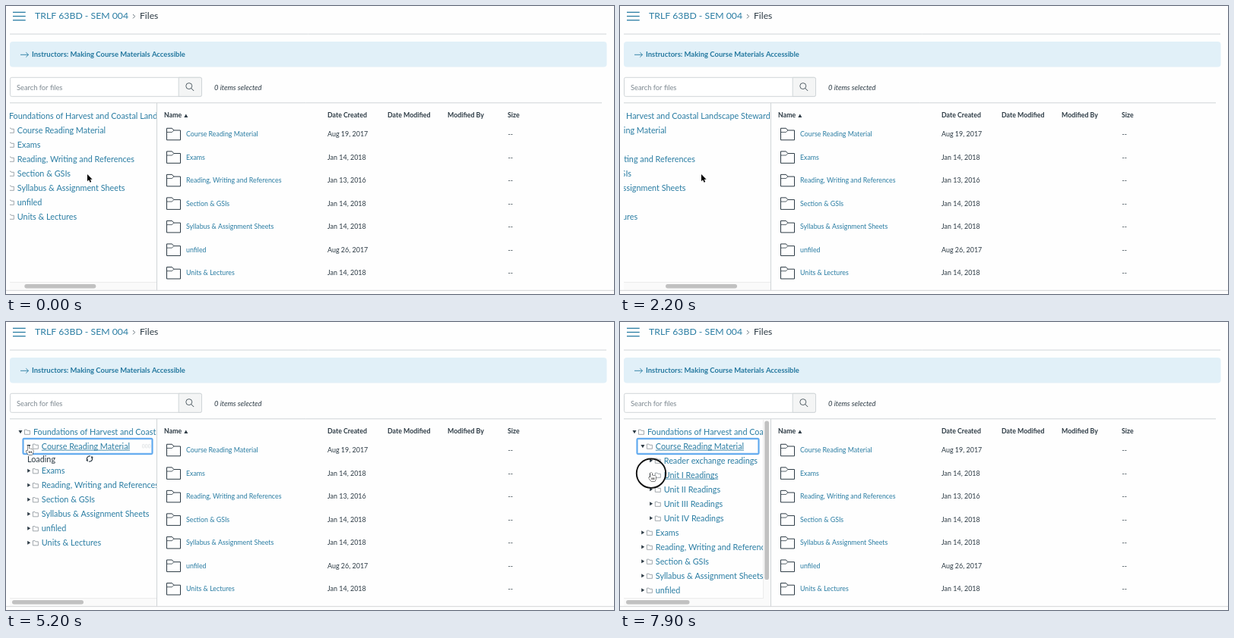
These frames come from a looping animation (800x380 px, 8000 ms). An HTML page with a canvas:

```html
<!DOCTYPE html>
<html lang="en">
<head>
<meta charset="utf-8">
<title>Files</title>
<style>
html, body { margin: 0; width: 100%; height: 100%; overflow: hidden; background: #fefefe; }
canvas { display: block; width: 800px; height: 380px; }
</style>
</head>
<body>
<canvas id="stage"></canvas>
<script>
const canvas = document.getElementById('stage');
const ctx = canvas.getContext('2d');
const dpr = window.devicePixelRatio || 1;
canvas.width = 800 * dpr;
canvas.height = 380 * dpr;

const LOOP = 8000, STEP = 100;
const LINK = '#2a7da3', DARK = '#2d3b45', RULE = '#d0d5d8';
const TREE = 10.83, CELL = 8.82;

const COURSE = 'TRLF 63BD - SEM 004';
const ROOT = 'Foundations of Harvest and Coastal Landscape Stewardship';
const FOLDERS = [
  ['Course Reading Material', 'Aug 19, 2017'],
  ['Exams', 'Jan 14, 2018'],
  ['Reading, Writing and References', 'Jan 13, 2016'],
  ['Section & GSIs', 'Jan 14, 2018'],
  ['Syllabus & Assignment Sheets', 'Jan 14, 2018'],
  ['unfiled', 'Aug 26, 2017'],
  ['Units & Lectures', 'Jan 14, 2018']
];
const READINGS = ['Reader exchange readings', 'Unit I Readings', 'Unit II Readings',
  'Unit III Readings', 'Unit IV Readings'];

// Moments of the interaction, in ms
const HOVER = 4000, OPEN = 4900, LOADED = 5700;

// Keys are [time, value, smooth?]
const SCROLL = [[0, 32], [500, 68], [1000, 102], [2200, 102], [2700, 0, 1]];
const CURSOR_X = [[2800, 107], [3700, 32.5, 1], [3900, 32.5], [4300, 29.5, 1],
  [5900, 29.5], [6600, 36.5, 1], [7000, 36.5], [7500, 41, 1]];
const CURSOR_Y = [[2800, 222], [3700, 163, 1], [5900, 163], [6600, 185, 1],
  [7000, 185], [7500, 198, 1]];

function at(keys, t) {
  if (t <= keys[0][0]) return keys[0][1];
  for (let i = 1; i < keys.length; i++) {
    const [t1, v1, smooth] = keys[i];
    if (t <= t1) {
      const [t0, v0] = keys[i - 1];
      let k = (t - t0) / (t1 - t0);
      if (smooth) k = k * k * (3 - 2 * k);
      return v0 + (v1 - v0) * k;
    }
  }
  return keys[keys.length - 1][1];
}

function text(str, x, y, size, color, style = '') {
  ctx.font = `${style} ${size}px Lato, sans-serif`;
  ctx.fillStyle = color;
  ctx.fillText(str, x, y);
}

function line(points, color, width = 1) {
  ctx.beginPath();
  points.forEach(([x, y], i) => i ? ctx.lineTo(x, y) : ctx.moveTo(x, y));
  ctx.strokeStyle = color;
  ctx.lineWidth = width;
  ctx.stroke();
}

function poly(points, color) {
  ctx.beginPath();
  points.forEach(([x, y]) => ctx.lineTo(x, y));
  ctx.closePath();
  ctx.fillStyle = color;
  ctx.fill();
}

function box(x, y, w, h, r, fill, stroke, width = 1) {
  ctx.beginPath();
  ctx.roundRect(x, y, w, h, r);
  if (fill) { ctx.fillStyle = fill; ctx.fill(); }
  if (stroke) { ctx.strokeStyle = stroke; ctx.lineWidth = width; ctx.stroke(); }
}

function header() {
  for (const y of [8.3, 13.5, 18.7]) line([[9, y], [25.7, y]], LINK, 1.3);
  text(COURSE, 38, 17.3, 12.25, LINK);
  line([[167, 11], [169.6, 13.7], [167, 16.4]], '#6b7780', 1);
  text('Files', 176, 17.3, 12.2, DARK);
  line([[5, 37], [790, 37]], RULE);

  box(5, 47, 785.5, 33.5, 4, '#e1f0f8');
  line([[19, 64.3], [29.5, 64.3]], LINK, 0.9);
  line([[26.3, 61.2], [29.5, 64.3], [26.3, 67.4]], LINK, 0.9);
  text('Instructors: Making Course Materials Accessible', 34, 67.2, 9.48, '#24789f', 'bold');

  box(5.5, 94.3, 252, 25, 2, '#fff', RULE);
  box(227.2, 94.3, 30.3, 25, [0, 2, 2, 0], '#f4f5f5', RULE);
  text('Search for files', 14, 110.5, 9.3, '#7d8890');
  ctx.beginPath();
  ctx.arc(240.8, 105.6, 4, 0, 7);
  ctx.strokeStyle = DARK;
  ctx.lineWidth = 0.8;
  ctx.stroke();
  line([[243.7, 108.5], [247.2, 112]], DARK, 0.9);
  text('0 items selected', 274, 110.7, 9.4, DARK, 'italic');
}

function bigFolder(x, y) {
  line([[x, y + 3], [x, y], [x + 7, y], [x + 9.3, y + 2.7], [x + 18, y + 2.7],
    [x + 18, y + 15.5], [x, y + 15.5], [x, y + 2]], DARK, 1);
  line([[x, y + 5.2], [x + 7, y + 5.2], [x + 9.3, y + 2.7]], DARK, 0.8);
}

function table() {
  line([[5, 127.8], [784, 127.8]], RULE);
  line([[198.5, 128], [198.5, 375]], RULE);
  const heads = [['Name', 208], ['Date Created', 423], ['Date Modified', 502],
    ['Modified By', 581], ['Size', 660]];
  for (const [label, x] of heads) text(label, x, 147.3, 8.8, DARK, 'bold');
  poly([[234.3, 147], [236.8, 142.6], [239.3, 147]], DARK);
  FOLDERS.forEach(([name, date], i) => {
    const y = 169 + i * 30.53;
    bigFolder(211.5, y - 7.7);
    text(name, 237, y + 3.2, CELL, LINK);
    text(date, 423, y + 3.2, 8.95, DARK);
    text('--', 660.5, y + 3.2, CELL, DARK);
  });
}

function treeRow(name, depth, y, open, underline) {
  const x = 16.5 + depth * 10.9;
  if (open) poly([[x, y - 2], [x + 5, y - 2], [x + 2.5, y + 2.3]], DARK);
  else poly([[x + 0.8, y - 2.8], [x + 4.8, y - 0.3], [x + 0.8, y + 2.2]], DARK);
  const fx = x + 8, fy = y - 2.9;
  line([[fx, fy + 1.5], [fx, fy], [fx + 2.7, fy], [fx + 3.5, fy + 1.2], [fx + 7, fy + 1.2],
    [fx + 7, fy + 6.2], [fx, fy + 6.2], [fx, fy + 1]], '#8b949a', 0.8);
  const tx = x + 19.4;
  text(name, tx, y + 3.7, TREE, LINK);
  if (underline) {
    const w = ctx.measureText(name).width;
    line([[tx, y + 5.2], [tx + w, y + 5.2]], LINK, 0.8);
  }
}

function spinner(x, y, angle) {
  ctx.save();
  ctx.translate(x, y);
  ctx.rotate(angle);
  for (let i = 0; i < 2; i++) {
    ctx.beginPath();
    ctx.arc(0, 0, 3.6, 0.25, 2.5);
    ctx.strokeStyle = DARK;
    ctx.lineWidth = 1.2;
    ctx.stroke();
    poly([[4.8, 1.6], [4.4, -1.6], [1.8, 0.9]], DARK);
    ctx.rotate(Math.PI);
  }
  ctx.restore();
}

function tree(t, pointerY) {
  const loaded = t >= LOADED;
  const loading = t >= OPEN && !loaded;
  const scroll = at(SCROLL, t);
  const right = loaded ? 188 : 198;

  ctx.save();
  ctx.beginPath();
  ctx.rect(5, 129, right - 5, 236);
  ctx.clip();
  ctx.translate(-scroll, 0);
  treeRow(ROOT, 0, 145, true, false);
  if (t >= OPEN) {
    const w = loaded ? 160 : 170;
    box(22.5, 153.9, w, 20.2, 2, null, '#c5e0fa', 3);
    box(22.5, 153.9, w, 20.2, 1, null, '#5ba7ee', 1.6);
  }
  treeRow(FOLDERS[0][0], 1, 164, t >= OPEN, t >= HOVER);
  if (t >= HOVER && !loaded) {
    for (let i = 0; i < 3; i++) box(179.5 + i * 4, 161.5, 2.4, 4.5, 0.6, null, '#dde1e4', 0.8);
  }
  let y = 183;
  if (loading) {
    text('Loading', 28, 185.2, TREE, DARK);
    spinner(110, 180.5, (t - OPEN) / 1000 * Math.PI - 1.6);
    y += 13.5;
  }
  if (loaded) {
    for (const name of READINGS) {
      treeRow(name, 2, y, false, Math.abs(pointerY + 1.5 - y) < 9.5);
      y += 19;
    }
  }
  for (const [name] of FOLDERS.slice(1)) {
    treeRow(name, 1, y, false, false);
    y += 19;
  }
  ctx.restore();

  ctx.fillStyle = '#fafafa';
  ctx.fillRect(5, 365, 193, 10);
  line([[5, 364.5], [198, 364.5]], '#ececec');
  box(8 + scroll * 0.51, 367, loaded ? 83.5 : 94, 5.5, 2.75, '#c1c1c1');
  if (loaded) {
    ctx.fillStyle = '#fafafa';
    ctx.fillRect(188, 129, 10, 236);
    line([[188.5, 129], [188.5, 365]], '#ececec');
    box(190.3, 130.5, 5.7, 209.5, 2.85, '#c1c1c1');
  }
  line([[0, 375.3], [800, 375.3]], '#d3d5d7');
}

function shape(x, y, path, fill, stroke) {
  ctx.save();
  ctx.translate(x, y);
  const p = new Path2D(path);
  ctx.lineJoin = 'round';
  ctx.lineWidth = 1;
  ctx.strokeStyle = stroke;
  ctx.fillStyle = fill;
  ctx.stroke(p);
  ctx.fill(p);
  ctx.restore();
}

function pointer(t, x, y) {
  if (t < HOVER) {
    shape(x, y, 'M0 0V9.2L2.1 7.3L3.6 10.7L5.2 10L3.7 6.7H6.6Z', '#000', '#fff');
    return;
  }
  shape(x, y, 'M-1 1Q0 -.8 1 1V4.5Q2 3.6 3 4.8Q4 4 4.8 5.2Q6.2 4.8 6.3 6.4V8.6L5.2 12H-.2L-3 8Q-3.4 6.4 -2 6.5L-1 7.4Z',
    '#fff', '#111');
  for (const dx of [0.8, 2.4, 4]) line([[x + dx, y + 7.4], [x + dx, y + 10]], '#111', 0.7);
}

function ring(x, y) {
  ctx.beginPath();
  ctx.arc(x, y, 19.2, 0, 7);
  ctx.strokeStyle = '#111';
  ctx.lineWidth = 1.9;
  ctx.stroke();
}

function draw(now) {
  const t = Math.floor(now % LOOP / STEP) * STEP;
  const x = at(CURSOR_X, t), y = at(CURSOR_Y, t);
  ctx.setTransform(dpr, 0, 0, dpr, 0, 0);
  ctx.fillStyle = '#fefefe';
  ctx.fillRect(0, 0, 800, 380);
  header();
  table();
  tree(t, y);
  pointer(t, x, y);
  if ((t >= 4600 && t < OPEN) || t >= 7600) ring(x, y + 1.7);
}

const start = performance.now();
function loop() {
  draw(performance.now() - start);
  requestAnimationFrame(loop);
}
loop();
</script>
</body>
</html>
```
